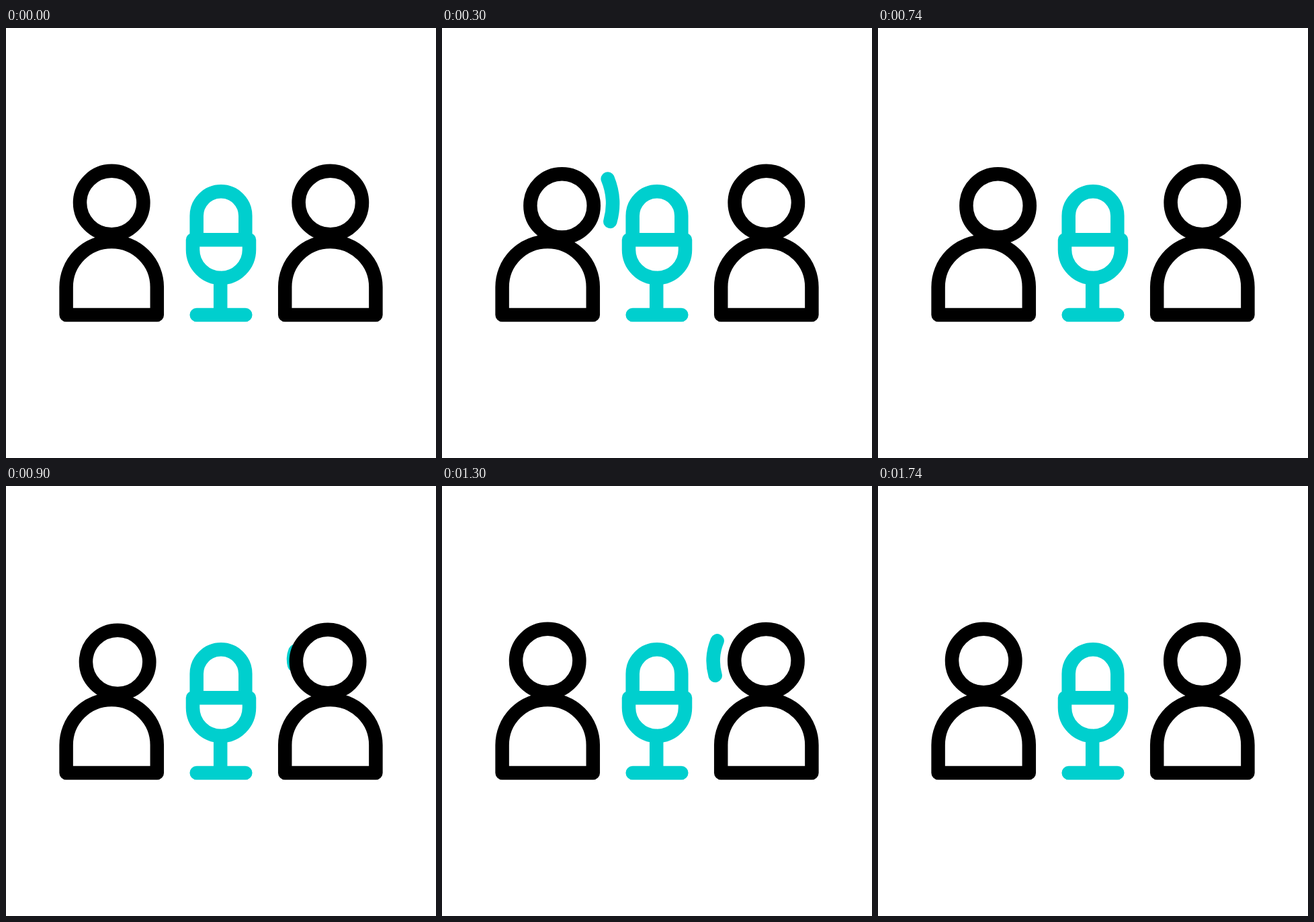
Animation, 640 px wide and 640 px high, one loop 1800 ms. Source, as an HTML page:

```html
<!DOCTYPE html>
<html>
<head>
<meta charset="utf-8">
<style>
  html, body { margin: 0; width: 100%; height: 100%; overflow: hidden; background: #fff; }
  svg { display: block; width: 100vw; height: 100vh; }
  g { fill: none; stroke-width: 20.5; stroke-linecap: round; stroke-linejoin: round; }
  .teal { stroke: #00cfce; }
  .ink { stroke: #000; }
  .head { fill: #fff; }
</style>
</head>
<body>
<svg viewBox="0 0 640 640">
  <defs>
    <path id="body" d="M89.6 427V385.6a67.6 67.6 0 0 1 135.2 0V427Z"/>
  </defs>
  <g class="teal">
    <path d="M283.7 315.3V279.6a36.3 36.3 0 0 1 72.6 0V315.3"/>
    <path d="M278 315.3H362V330a42 42 0 0 1-84 0Z"/>
    <path d="M319.2 372V427M283.7 427H356.3"/>
  </g>
  <g>
    <path class="teal wave"/>
    <use class="ink" href="#body"/>
    <circle class="ink head" r="47.2"/>
  </g>
  <g transform="matrix(-1 0 0 1 640 0)">
    <path class="teal wave"/>
    <use class="ink" href="#body"/>
    <circle class="ink head" r="47.2"/>
  </g>
</svg>
<script>
const LOOP = 1800, STEP = 20, NOD = 240;
const waves = document.querySelectorAll('.wave');
const heads = document.querySelectorAll('.head');

// The right speaker is drawn mirrored. Wave times: grow from/to, shrink from/to.
const speakers = [
  { start: 40, dx: 22.3, dy: 4.6, mouth: 203.7, wave: [40, 355, 480, 760] },
  { start: 800, dx: 9.3, dy: 2.6, mouth: 195.4, wave: [800, 1112, 1195, 1520] }
];

// Bezier ease with handles (1/6, 0) and (5/6, 1)
function ease(x) {
  if (x <= 0) return 0;
  if (x >= 1) return 1;
  let lo = 0, hi = 1;
  for (let i = 0; i < 24; i++) {
    const m = (lo + hi) / 2;
    if (m * (0.5 + m * (1.5 - m)) < x) lo = m; else hi = m;
  }
  return lo * lo * (3 - 2 * lo);
}

function nod(t) {
  const n = t / NOD;
  if (n <= 0 || n >= 4) return 0;
  const phase = n % 2;
  return ease(phase < 1 ? phase : 2 - phase);
}

function wavePath(x, s) {
  const y = 256.2, r = 112 * s;
  return `M${x + 49.2 * s} ${y - 36.4 * s}A${r} ${r} 0 0 1 ${x + 53.4 * s} ${y + 36.4 * s}`;
}

function draw(now) {
  const t = Math.floor(now % LOOP / STEP) * STEP;
  speakers.forEach((p, i) => {
    const k = nod(t - p.start);
    heads[i].setAttribute('cx', 157.2 + p.dx * k);
    heads[i].setAttribute('cy', 260 + p.dy * k);
    const [a, b, c, d] = p.wave;
    const s = ease((t - a) / (b - a)) - ease((t - c) / (d - c));
    waves[i].setAttribute('d', s > 0 ? wavePath(p.mouth, s) : '');
  });
}

const begin = performance.now();
function tick() {
  draw(performance.now() - begin);
  requestAnimationFrame(tick);
}
tick();
</script>
</body>
</html>
```
